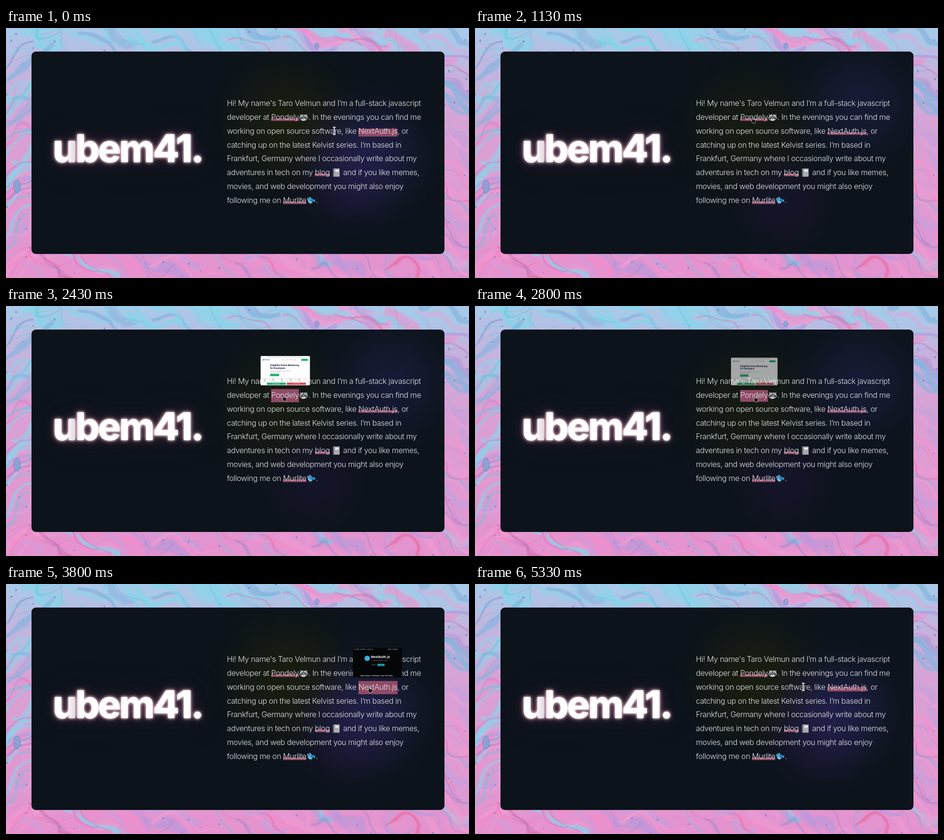
These frames come from a looping animation (962 by 520 pixels, 5360 ms). An HTML page:

```html
<!DOCTYPE html>
<html lang="en">
<head>
<meta charset="utf-8">
<title>Profile card</title>
<style>
  html, body { margin: 0; width: 100%; height: 100%; overflow: hidden; background: #e697cf; }
  svg { position: absolute; left: 0; top: 0; width: 962px; height: 520px; display: block; }
  text { font-family: Inter, "Open Sans", sans-serif; font-optical-sizing: none; white-space: pre; }
  #copy text { font-size: 16.05px; font-weight: 300; letter-spacing: -0.025em; fill: #e0e2e5; }
  .logo { font-size: 80px; font-weight: 800; letter-spacing: -0.05em; }
</style>
</head>
<body>
<svg viewBox="0 0 962 520">
  <defs>
    <linearGradient id="wash" x2="0" y2="1">
      <stop offset=".12" stop-color="#a9c9e8"/><stop offset=".4" stop-color="#d8a3d6"/><stop offset="1" stop-color="#e88fcc"/>
    </linearGradient>
    <filter id="marble" x="-80" y="-80" width="1122" height="680" filterUnits="userSpaceOnUse" color-interpolation-filters="sRGB">
      <feGaussianBlur stdDeviation="1"/>
      <feDisplacementMap in2="n" scale="0"/>
      <feTurbulence type="fractalNoise" baseFrequency=".012" numOctaves="2" seed="8" result="n"/>
      <feGaussianBlur in="SourceGraphic" stdDeviation="1.2" result="s"/>
      <feDisplacementMap in="s" in2="n" scale="60" xChannelSelector="R" yChannelSelector="G"/>
    </filter>
  </defs>
  <g id="paint" filter="url(#marble)" fill="none" stroke-linecap="round">
    <rect x="-80" y="-80" width="1122" height="680" fill="url(#wash)"/>
  </g>
  <g id="drops" fill="#71a8d3" stroke="#667cba" opacity=".75"></g>
</svg>

<svg viewBox="0 0 962 520">
  <defs id="defs">
    <clipPath id="cardClip"><rect x="53" y="49" width="858" height="421" rx="9"/></clipPath>
    <linearGradient id="ink" gradientUnits="userSpaceOnUse" x1="97" x2="411">
      <stop offset=".09" stop-color="#fff"/><stop offset=".14" stop-color="#e6dde4"/><stop offset=".19" stop-color="#fff"/>
    </linearGradient>
    <filter id="glow" x="0" y="80" width="520" height="340" filterUnits="userSpaceOnUse" color-interpolation-filters="sRGB"></filter>
  </defs>
  <g clip-path="url(#cardClip)">
    <rect x="53" y="49" width="858" height="421" fill="#0c131a"/>
    <g id="lights"></g>
    <text class="logo" x="97" y="279" fill="url(#ink)" filter="url(#glow)">ubem41.</text>
  </g>
  <g id="bars" fill="#8f4a66"></g>
  <g id="copy"></g>

  <g id="raccoon">
    <path d="M-8-7l5 2-4 5zM8-7l-5 2 4 5z" fill="#6d7175"/>
    <path d="M-9 2Q-7-6 0-6T9 2Q5 7 0 7.500T-9 2z" fill="#b9bcbd"/>
    <path d="M-1-1Q-5-3-8 3q4 2 6 0zM1-1q4-2 7 4-4 2-6 0z" fill="#33383d"/>
    <path d="M-1-6h2l.6 6h-3.200z" fill="#54595d"/>
    <ellipse cy="4" rx="2.800" ry="2.500" fill="#eee"/>
    <circle cy="3" r="1.300" fill="#15181b"/>
    <path d="M-4.500 1h1M3.500 1h1" stroke="#fff" stroke-width="1.400"/>
  </g>
  <g id="notebook">
    <rect x="-7" y="-8.500" width="13.500" height="17" rx="1" fill="#a9acae"/>
    <path d="M-6-8.500v17" stroke="#686c70" stroke-width="2"/>
    <path d="M-2.500-4h7" stroke="#eceded" stroke-width="4"/>
  </g>
  <g id="bird">
    <path d="M-9-4l3-1q1-3 4-2.500 2 .5 2.500 3l5 3 3.500-1-1 2.500 1 3-5-1q-2 4-6 4-5-1-5-7z" fill="#3f9fd0"/>
    <path d="M-6-1q1 6 5 6 2 0 3-1.500-5 0-8-4.500z" fill="#a9d6e8"/>
    <path d="M-1-2q5 0 7 4-5 2-7-4z" fill="#1e6d9c"/>
    <path d="M-9-4l2.500-1v2z" fill="#d9a33c"/>
    <circle cx="-4.300" cy="-4.600" r=".8" fill="#111"/>
    <path d="M-2 6v2M1 6v2" stroke="#b78a3a" stroke-width=".8"/>
  </g>

  <g id="tipA">
    <rect x="529" y="104" width="102.500" height="61" rx="2" fill="#fdfdfe"/>
    <path d="M545 106.300h70" stroke="#b9a9b4" stroke-width=".8" stroke-dasharray="4 .8 2 .8"/>
    <circle cx="535" cy="112" r="1.400" fill="#3183d5"/>
    <text x="537" y="113" font-size="2.800" font-weight="700" fill="#3972a8">Pondely</text>
    <path d="M574 112h30" stroke="#a6a9b8" stroke-width=".9" stroke-dasharray="5 3"/>
    <path d="M613.500 112H627" stroke="#25b374" stroke-width="4.400"/>
    <g font-size="4.700" font-weight="700" letter-spacing="-.15" fill="#20264f">
      <text x="549" y="124.500">Delightful Active Monitoring</text><text x="549" y="130.500">for Developers</text>
    </g>
    <path d="M549 135.300h41M549 138.300h22" stroke="#b5a4b9" stroke-width=".9" stroke-dasharray="4 .7 3 .7"/>
    <path d="M549 143.500h18.500" stroke="#25b374" stroke-width="5"/>
    <path d="M533 150.500h95M533 158.500h95" stroke="#d8d8df" stroke-width=".6"/>
    <path d="M535 152.500h88M536 156h82" stroke="#777b8b" stroke-dasharray="4 8 1 5"/>
    <path d="M542 161.800h39.500" stroke="#20b070" stroke-width="4.500"/>
    <path d="M583.500 161.800H623" stroke="#d84555" stroke-width="4.500"/>
    <path d="M553 161.800h16M595 161.800h16" stroke="#fff" stroke-width=".7" opacity=".7"/>
  </g>

  <g id="tipB">
    <rect x="720.500" y="133" width="102.500" height="61.500" rx="1.500" fill="#050608"/>
    <circle cx="723.500" cy="135.800" r=".9" fill="#35a9e0"/>
    <path d="M726 135.800h37M793 135.800h24" stroke="#aaa" stroke-width=".9" stroke-dasharray="8 2 11 3"/>
    <circle cx="750.500" cy="154.500" r="5.600" fill="#36b0df"/>
    <text x="758.500" y="154.300" font-size="6.700" font-weight="700" fill="#fff">NextAuth.js</text>
    <text x="761" y="160.300" font-size="2.700" fill="#8d9298">Authentication for Next.js</text>
    <path d="M759 168.300h9" stroke="#777"/>
    <path d="M772 168.300h14.500" stroke="#1bb9cc" stroke-width="4.500"/>
    <path d="M774 168.300h10.500" stroke="#08343b" stroke-width=".8"/>
    <text x="736.500" y="192.200" font-size="3.500" font-weight="600" fill="#e8e8e8">Open Source  Full Stack  Own Your Data</text>
  </g>

  <path id="hand" d="M-1.300-4.700a1 1 0 0 1 2 0V-1l4.200.9q1.400.3 1.300 1.800L5.500 5q-.2 2-2 2H1q-1 0-1.600-.9L-3.500 2q-.5-1 .5-1.300l1.700 1z" fill="#101114" stroke="#dcdcdc" stroke-width=".8"/>
  <g id="beam">
    <path d="M-3-7.500h6M0-7.500v15M-3 7.500h6" stroke="#555b61" stroke-width="3.200"/>
    <path d="M-3-7.500h6M0-7.500v15M-3 7.500h6" stroke="#e4e4e4" stroke-width="1.500"/>
  </g>
</svg>

<script>
const LOOP = 5360;
const $ = id => document.getElementById(id);

function set(el, attrs) {
  for (const k in attrs) el.setAttribute(k, attrs[k]);
  return el;
}
function add(parent, tag, attrs) {
  return parent.appendChild(set(document.createElementNS("http://www.w3.org/2000/svg", tag), attrs));
}

// Poured paint: seeded strokes, wide ones first, cooler towards the top
let seed = 91;
const rnd = (a, b) => {
  seed = (seed * 16807) % 2147483647;
  return a + (b - a) * seed / 2147483647;
};
const pick = list => list[Math.floor(rnd(0, list.length))];
const COOL = ["#80d9ec", "#8fd3ea", "#84b4de"];
const WARM = ["#f58ccb", "#f09bd4", "#c9a0dc", "#b49ade"];
const FINE = ["#e9659f", "#8488c8", "#f7a5d6", "#6fc3dc", "#b177c4"];

function rimPoint() {
  let x, y;
  do { x = rnd(0, 962); y = rnd(0, 520); } while (x > 60 && x < 904 && y > 56 && y < 463);
  return [x, y];
}
const STROKES = 190;
for (let i = 0; i < STROKES; i++) {
  const [x, y] = rimPoint();
  const p = i / STROKES;
  const dx = rnd(35, 75), dy = rnd(12, 40) * (x < 60 ? -1 : 1);
  add($("paint"), "path", {
    d: `M${x - dx} ${y - dy}q${dx * .7} ${rnd(-18, 18)} ${dx} ${dy}t${dx} ${dy}`,
    stroke: p > .55 ? pick(FINE) : pick(rnd(0, 1) < .65 - y / 1000 ? COOL : WARM),
    "stroke-width": 1 + 22 * (1 - p) ** 2 * rnd(.5, 1),
    opacity: rnd(.4, .75)
  });
}
const drop = (cx, cy, rx, ry) => add($("drops"), "ellipse", { cx, cy, rx, ry });
drop(646, 37, 4.5, 6);
drop(23, 330, 7, 14);
for (let i = 0; i < 45; i++) {
  const r = rnd(.6, 1.9);
  drop(...rimPoint(), r, r);
}

// Neon halo: [blur, strength, colour], widest first
const halo = [[32, .5, "#331c30"], [14, .55, "#553044"], [6, .85, "#b87f98"], [2.4, 1.3, "#fbdfe9"]];
halo.forEach(([blur, gain, color], i) => {
  add($("glow"), "feGaussianBlur", { in: "SourceAlpha", stdDeviation: blur });
  add($("glow"), "feComponentTransfer", { result: "alpha" + i })
    .append(add($("glow"), "feFuncA", { type: "linear", slope: gain }));
  add($("glow"), "feFlood", { "flood-color": color });
  add($("glow"), "feComposite", { in2: "alpha" + i, operator: "in", result: "halo" + i });
});
const merge = add($("glow"), "feMerge", {});
for (const layer of [...halo.keys()].map(i => "halo" + i).concat("SourceGraphic"))
  add(merge, "feMergeNode", { in: layer });

// Paragraph: [links] get a marker bar, {icons} take one emoji advance
const EMOJI = 19.7, THIN = 5.5, FULL = 27.5;
const lines = [
  "Hi! My name's Taro Velmun and I’m a full-stack javascript",
  "developer at [Pondely]{raccoon}. In the evenings you can find me",
  "working on open source software, like [NextAuth.js], or",
  "catching up on the latest Kelvist series. I’m based in",
  "Frankfurt, Germany where I occasionally write about my",
  "adventures in tech on my [blog] {notebook} and if you like memes,",
  "movies, and web development you might also enjoy",
  "following me on [Murlite]{bird}."
];
const bars = [];

// The marker grows from a thin underline to the full line box
function setBar({ el, mid }, hover) {
  const height = THIN + (FULL - THIN) * hover;
  set(el, { y: mid + 8 + 7 * hover - height, height });
}
lines.forEach((line, n) => {
  let x = 459;
  const y = Math.round(162 + 28.85 * n), mid = y - 5.8;
  for (const part of line.split(/(\[.+?\]|\{.+?\})/).filter(Boolean)) {
    const word = part.replace(/[[\]{}]/g, "");
    if (part[0] === "{") {
      set($(word), { transform: `translate(${x + EMOJI / 2} ${mid + .5})` });
      x += EMOJI;
      continue;
    }
    const run = add($("copy"), "text", { x, y });
    run.textContent = word;
    const width = run.getComputedTextLength();
    if (part[0] === "[") {
      const bar = { mid, el: add($("bars"), "rect", { x, width }) };
      setBar(bar, 0);
      bars.push(bar);
    }
    x += width;
  }
});

// Coloured lights drift between a resting place and a far one: [x, y, opacity]
const lights = [
  { color: "#1c200c", r: 185, near: [582, 200, .78], far: [568, 215, .62] },
  { color: "#211640", r: 140, near: [705, 325, .38], far: [640, 365, .4] },
  { color: "#29265f", r: 170, near: [752, 267, .6], far: [800, 160, .38] }
];
lights.forEach((light, i) => {
  const g = add($("defs"), "radialGradient", { id: "light" + i });
  for (let s = 0; s <= 1; s += .125)
    add(g, "stop", { offset: s, "stop-color": light.color, "stop-opacity": (1 + Math.cos(Math.PI * s)) / 2 });
  light.el = add($("lights"), "circle", { r: light.r, fill: `url(#light${i})` });
});

// Eased 0..1 between two times
function ramp(t, a, b) {
  const p = Math.min(1, Math.max(0, (t - a) / (b - a)));
  return p * p * (3 - 2 * p);
}
const mix = (a, b, p) => a.map((v, i) => v + (b[i] - v) * p);

const REST = [682, 214], LINK_A = [577, 191], LINK_B = [755, 219];
const moves = [[130, 1130, LINK_A], [2730, 3430, LINK_B], [4830, 5200, REST]];

function cursorAt(t) {
  let pos = REST;
  for (const [a, b, goal] of moves) {
    const p = ramp(t, a, b);
    pos = mix(pos, goal, p);
    pos[1] += 9 * Math.sin(Math.PI * p);
  }
  return pos;
}
function setTip(id, x, y, v) {
  set($(id), { opacity: v, transform: `translate(${x} ${y}) scale(${.85 + .15 * v}) translate(${-x} ${-y})` });
}

function draw(t) {
  const drift = ramp(t, 130, 830) - ramp(t, 2730, 3800);
  for (const { el, near, far } of lights) {
    const [cx, cy, opacity] = mix(near, far, drift);
    set(el, { cx, cy, opacity });
  }

  // The second link is still closing from an earlier hover when the loop starts
  setBar(bars[0], ramp(t, 1130, 1370) - ramp(t, 2740, 3000));
  setBar(bars[1], ramp(t, 3270, 3500) - ramp(t, 4880, 5500) + .5 * (1 - ramp(t, 130, 350)));
  setTip("tipA", 580, 165, ramp(t, 1170, 1360) - ramp(t, 2730, 2900));
  setTip("tipB", 772, 194.5, ramp(t, 3300, 3500) - ramp(t, 4840, 5000));

  const transform = `translate(${cursorAt(t).join(" ")})`;
  const onLink = (t >= 1100 && t < 2850) || (t >= 3230 && t < 4950);
  set($("hand"), { transform, opacity: +onLink });
  set($("beam"), { transform, opacity: +!onLink });
}

function tick() {
  draw(performance.now() % LOOP);
  requestAnimationFrame(tick);
}
tick();
</script>
</body>
</html>
```
